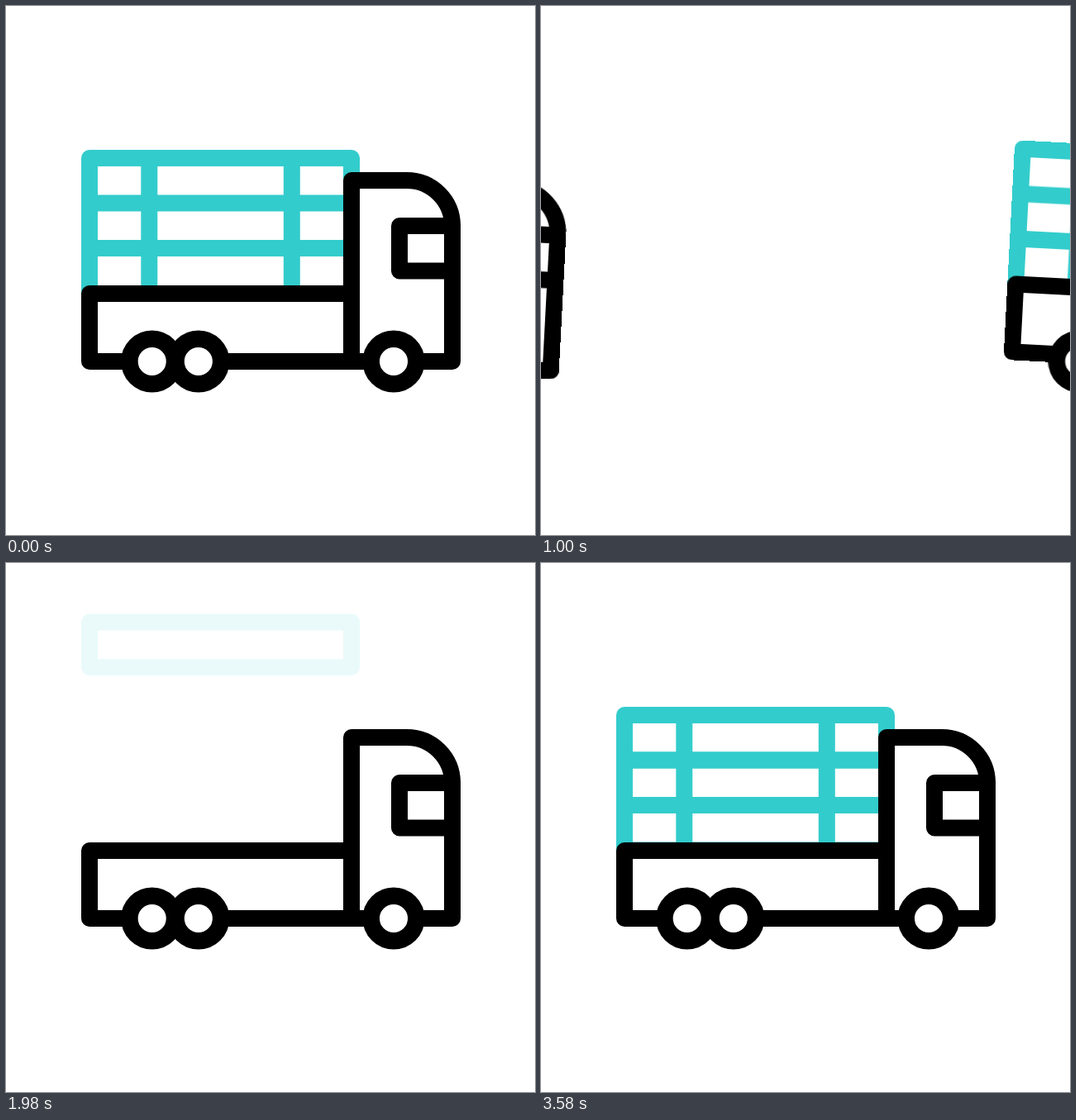
These frames come from a looping animation (640 by 640 pixels, 3.6 s). An HTML page without scripts:

```html
<!DOCTYPE html>
<html lang="en">
<head>
<meta charset="utf-8">
<title>Truck</title>
<style>
  html, body { margin: 0; width: 100%; height: 100%; overflow: hidden; background: #fff; }
  svg { display: block; width: 100%; height: 100%; }
  svg * { animation: 3600ms linear infinite; }

  :root {
    --smooth: cubic-bezier(.333, 0, .667, 1);
    --fall: cubic-bezier(.333, 0, .667, .333);
    --rise: cubic-bezier(.333, .667, .667, 1);
  }

  .chassis, .load { fill: none; stroke-width: 20; stroke-linejoin: round; stroke-linecap: round; }
  .chassis { stroke: #000; }
  .load { stroke: #3cc; }
  .wheels { fill: #fff; stroke: #000; stroke-width: 20.5; }

  /* driving and body tilt */
  .leave { animation-name: leave; animation-timing-function: var(--smooth); }
  .arrive { animation-name: arrive; animation-timing-function: var(--smooth); }
  .tilt { transform-origin: 320px 320px; animation-timing-function: var(--smooth); }
  .leave .tilt { animation-name: lean; }
  .arrive .tilt { animation-name: brake; }
  .arrive .chassis { animation-name: dip; }

  @keyframes leave {
    0% { transform: translateX(0); }
    5.56% { transform: translateX(-20px); }
    38.61%, 100% { transform: translateX(640px); }
  }
  @keyframes lean {
    0% { transform: rotate(0deg); }
    5.56% { transform: rotate(-3deg); }
    13.33%, 100% { transform: rotate(3deg); }
  }
  @keyframes arrive {
    0%, 21.11% { transform: translateX(-640px); }
    45.56%, 100% { transform: translateX(0); }
  }
  @keyframes brake {
    0%, 32.78% { transform: rotate(3deg); }
    45.56% { transform: rotate(-3deg); }
    49.44% { transform: rotate(2deg); }
    52.78%, 100% { transform: rotate(0deg); }
  }
  @keyframes dip {
    0%, 62.2%, 65%, 68.8%, 71.6%, 74.9%, 78%, 100% { transform: translateY(0); }
    62.8%, 69.4%, 75.56% { transform: translateY(2px); }
  }

  /* panels fall, bounce once and fade in */
  .low { animation-name: fall-low; }
  .mid { animation-name: fall-mid; }
  .top { animation-name: fall-top; }
  .low rect { animation-name: fade; animation-delay: -1650ms; }
  .mid rect { animation-name: fade; animation-delay: -1375ms; }
  .top rect { animation-name: fade; animation-delay: -1099ms; }

  @keyframes fall-low {
    0%, 54.17% { transform: translateY(-246px); animation-timing-function: var(--fall); }
    62.5% { transform: translateY(0); animation-timing-function: var(--rise); }
    64.58% { transform: translateY(-12px); animation-timing-function: var(--fall); }
    66.67%, 100% { transform: translateY(0); }
  }
  @keyframes fall-mid {
    0%, 61.81% { transform: translateY(-147px); animation-timing-function: var(--fall); }
    69.11% { transform: translateY(0); animation-timing-function: var(--rise); }
    71.2% { transform: translateY(-12px); animation-timing-function: var(--fall); }
    73.28%, 100% { transform: translateY(0); }
  }
  @keyframes fall-top {
    0%, 69.47% { transform: translateY(-93px); animation-timing-function: var(--fall); }
    75.28% { transform: translateY(0); animation-timing-function: var(--rise); }
    77.36% { transform: translateY(-12px); animation-timing-function: var(--fall); }
    79.44%, 100% { transform: translateY(0); }
  }
  @keyframes fade {
    0% { opacity: 0; }
    8.44%, 48% { opacity: 1; }
    48.01%, 100% { opacity: 0; }
  }

  /* upright slats grow downwards */
  .slat { stroke-dasharray: 164 400; animation-name: grow; }
  .slat.rear { animation-delay: -1135ms; }
  .slat.front { animation-delay: -675ms; }
  @keyframes grow {
    0% { stroke-dashoffset: 164px; opacity: 1; animation-timing-function: var(--smooth); }
    16.67%, 38% { stroke-dashoffset: 0px; opacity: 1; }
    38.01%, 100% { stroke-dashoffset: 0px; opacity: 0; }
  }
</style>
</head>
<body>
<svg viewBox="0 0 640 640">
  <defs>
    <g id="chassis">
      <rect x="101" y="348" width="317" height="82"/>
      <path d="M418 430V211H485A55 55 0 0 1 540 266V430Z"/>
      <path d="M540 266H476V320.5H540"/>
    </g>
    <g id="wheels">
      <circle cx="176.7" cy="430" r="27.3"/>
      <circle cx="232.8" cy="430" r="27.3"/>
      <circle cx="469" cy="430" r="27.3"/>
    </g>
    <rect id="panel" x="101" width="317" height="54.5"/>
  </defs>

  <g class="leave">
    <g class="tilt">
      <path class="load" d="M101 184H418V348H101ZM101 238.5H418M101 293H418M173.3 184V348M345.8 184V348"/>
      <use href="#chassis" class="chassis"/>
    </g>
    <use href="#wheels" class="wheels"/>
  </g>

  <g class="arrive">
    <g class="tilt">
      <g class="load">
        <g class="top"><rect x="101" y="184" width="317" height="54.5"/></g>
        <g class="mid"><rect x="101" y="238.5" width="317" height="54.5"/></g>
        <g class="low"><rect x="101" y="293" width="317" height="54.5"/></g>
        <path class="slat rear" d="M173.3 184V348"/>
        <path class="slat front" d="M345.8 184V348"/>
      </g>
      <use href="#chassis" class="chassis"/>
    </g>
    <use href="#wheels" class="wheels"/>
  </g>
</svg>
</body>
</html>
```
